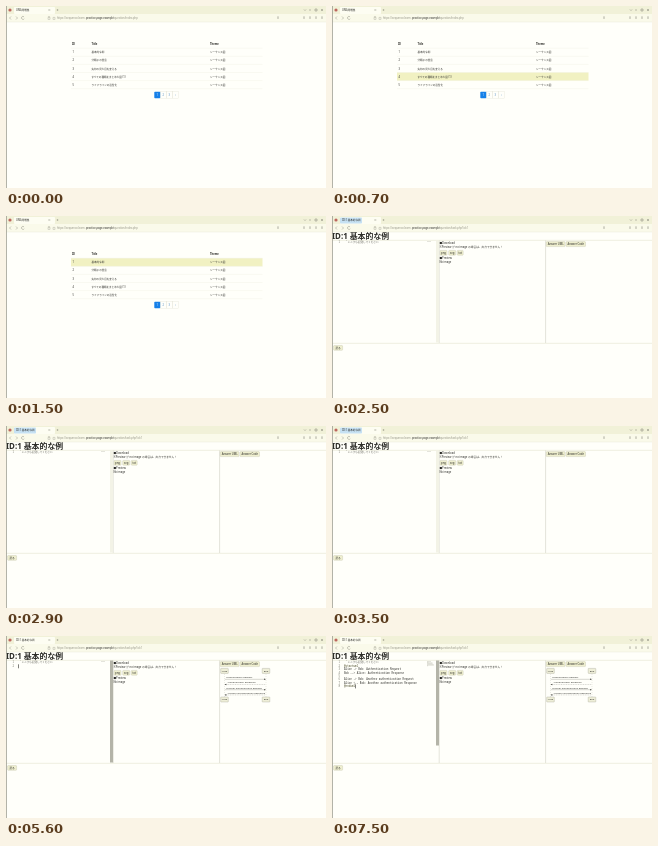
Write an HTML page that moves like this. It is 320 px wide and 182 px high and loops after 8000 ms.

```html
<!DOCTYPE html>
<html lang="ja">
<head>
<meta charset="utf-8">
<style>
html, body { margin: 0; width: 100%; height: 100%; overflow: hidden; background: #fffffa; }
svg { display: block; width: 100vw; height: 100vh; }
text { font-family: "Noto Sans", "Noto Sans CJK JP", "Noto Sans CJK", sans-serif; white-space: pre; }
.mono { font-family: "Noto Sans Mono", "Noto Sans CJK JP", "Noto Sans CJK", monospace; }
</style>
</head>
<body>
<svg id="stage" viewBox="0 0 320 182" preserveAspectRatio="none"></svg>
<script>
const LOOP = 8000, PAPER = '#fffffa', INK = '#2c2c28', RULE = '#deded0';
const BOLD = 'font-weight="700"', MID = 'text-anchor="middle"', MONO = 'class="mono"';
const stage = document.getElementById('stage');

const esc = s => s.replace(/&/g, '&amp;').replace(/</g, '&lt;');
const text = (x, y, s, size = 2.6, fill = INK, extra = '') =>
  `<text x="${x}" y="${y}" font-size="${size}" fill="${fill}" ${extra}>${esc(s)}</text>`;
const rect = (x, y, w, h, fill, extra = '') =>
  `<rect x="${x}" y="${y}" width="${w}" height="${h}" fill="${fill}" ${extra}/>`;
const path = (d, stroke = RULE, width = .5, extra = '') =>
  `<path d="${d}" fill="none" stroke="${stroke}" stroke-width="${width}" ${extra}/>`;
const group = (id, body) => `<g id="${id}">${body}</g>`;

function button(x, y, w, h, label) {
  return rect(x, y, w, h, '#efefcf', 'stroke="#b4b49c" stroke-width=".3" rx=".7"') +
    text(x + w / 2, y + h / 2 + .95, label, 2.7, INK, MID + ' font-weight="500"');
}

function browser() {
  const icons = [272, 298, 304, 310, 316].map(x => path(`M${x - 1} 11h2M${x - 1} 12.2h2`, '#77776a', .4)).join('');
  return rect(0, 0, 320, 8, '#f1f1d8') + rect(0, 8, 320, 8, '#fafaea') +
    rect(8, 1, 41, 7, '#fdfdf2', 'rx=".8"') +
    rect(8, 1.5, 22, 6, '#c6e1f3', 'id="loading" rx=".8"') +
    '<circle cx="4" cy="4" r="1.6" fill="#bd665d"/>' +
    text(10, 5, '', 2.6, INK, 'id="tabName"') +
    path('M42.5 3.2l1.6 1.6m0-1.6l-1.6 1.6M50.5 4h2m-1-1v2', '#77776a', .35) +
    path('M298 3.5l1 1 1-1M303 4h2M309 3h2v2h-2zM315 3l2 2m0-2l-2 2', '#66665c', .4) +
    path('M5 10.5l-1.5 1.5L5 13.5M10 10.5l1.5 1.5L10 13.5M18 10.8a1.5 1.5 0 1 0 .3 1.8', '#77776a', .4) +
    path('M42 11.4h2v2h-2zM42.4 11.3v-.8h1.2v.8M47 11.4h2v2h-2z', '#88887a', .3) +
    text(51, 12.9, 'https://sequence-learn.', 2.6, '#929284') +
    text(80, 12.9, 'practice-page.example', 2.6, INK) +
    text(107, 12.9, '', 2.6, '#929284', 'id="address"') + icons +
    path('M0 16H320', '#e6e6d4', .4) + rect(0, 0, .8, 182, '#a0a094');
}

function listPage() {
  const titles = ['基本的な例', '分類子の宣言', '矢印の見た目を変える', 'すべての種類をまとめた図 (1)', 'ライフラインの活性化'];
  let out = rect(65, 0, 191.5, 8.1, '#f1f1c2', 'id="hover"');
  ['ID', 'Title', 'Theme'].forEach((s, i) =>
    out += text([66, 85.5, 204][i], 39.4, s, 2.6, INK, BOLD));
  titles.forEach((s, i) => {
    const y = 47.3 + i * 8.1;
    out += text(66.5, y, String(i + 1)) + text(85.5, y, s, 2.55) + text(204, y, 'シーケンス図', 2.6);
  });
  for (let i = 0; i < 6; i++) out += path(`M65 ${42.2 + i * 8.1}H256.5`, '#ecece0', .35);
  out += rect(148.3, 85.7, 6, 6.5, '#1680e8', 'rx=".7"');
  ['1', '2', '3', '›'].forEach((s, i) => {
    const x = 148.3 + i * 6;
    if (i) out += rect(x, 85.7, 6, 6.5, 'none', 'stroke="#e2e2d4" stroke-width=".35"');
    out += text(x + 3, 89.9, s, 2.6, i ? '#4a86c0' : '#fff', MID);
  });
  return out;
}

function diagram() {
  let out = '';
  [[218.5, 'Alice'], [260, 'Bob']].forEach(([x, name]) => {
    out += path(`M${x} 38V61`, '#b0b0a6', .25, 'stroke-dasharray="1 1"');
    [32.4, 61].forEach(y => out += rect(x - 3.8, y, 7.6, 5, '#efefd8', 'stroke="#8e8e80" stroke-width=".3" rx=".5"') +
      text(x, y + 3.4, name, 2.5, INK, MID));
  });
  ['Authentication Request', 'Authentication Response', 'Another authentication Request', 'Another authentication Response']
    .forEach((s, i) => {
      const y = 43.3 + i * 5.2, back = i % 2, tip = back ? 218.8 : 259.7, d = back ? 1.5 : -1.5;
      out += text(back ? 221.5 : 220, y - 1.1, s, 2.4) +
        path(`M218.8 ${y}H259.7`, '#77776c', .3, back ? 'stroke-dasharray="1 .7"' : '') +
        `<path d="M${tip} ${y}l${d} -.8v1.6z" fill="${INK}"/>`;
    });
  return out;
}

function editor() {
  const code = ['@startuml', 'Alice -> Bob: Authentication Request', 'Bob --> Alice: Authentication Response', '',
    'Alice -> Bob: Another authentication Request', 'Alice <-- Bob: Another authentication Response', '@enduml'];
  const line = i => 27.3 + i * 3.4;
  const number = i => text(6.5, line(i), String(i + 1), 2.6, '#77776c', MONO);
  let pasted = '';
  code.forEach((s, i) => {
    pasted += number(i + 1) + text(12, line(i + 1), s, 2.65, s[0] === '@' ? '#4b4b28' : INK, MONO);
    if (s) pasted += path(`M95 ${26.2 + i * .6}h${s.length * .15}`, '#a5a594', .3);
  });
  return rect(104, 24.5, 3, 102, '', 'id="scroll"') + number(0) +
    text(14, line(0), "'ここから記述してください", 2.6, '#55554c', MONO) +
    path('M95 25.5h4', '#a5a594', .3) +
    group('lineTwo', number(1)) + group('code', pasted) + rect(12.3, 0, .6, 4, INK, 'id="caret"');
}

function taskPage() {
  return text(0, 22.5, 'ID:1 基本的な例', 7.9, INK, BOLD) +
    group('panels',
      path('M107.2 24.3V127M213.6 24.3V127', '#c8c8ba', .5) + path('M0 24.3H320M0 127.3H320', '#dcdcc4', .5) +
      editor() +
      text(107.4, 28, '■Download', 2.7) +
      text(107.4, 32, '※Preview が no image の場合は、出力できません！', 2.7) +
      button(108, 34.4, 7, 4.8, 'png') + button(116.7, 34.4, 7, 4.8, 'svg') + button(125.2, 34.4, 6, 4.8, 'txt') +
      text(107.4, 43.2, '■Preview', 2.7) + text(107.4, 47.2, 'No image', 2.6) +
      button(214.3, 25.6, 18.7, 5, 'Answer UML') + button(234, 25.6, 19.5, 5, 'Answer Code') +
      group('answer', diagram()) + button(1.6, 129.5, 9, 4.8, '戻る'));
}

stage.innerHTML = rect(0, 0, 320, 182, PAPER) +
  group('list', listPage()) + group('task', taskPage()) + browser();

const $ = id => document.getElementById(id);
const show = (id, on) => $(id).setAttribute('display', on ? 'inline' : 'none');

function draw(t) {
  const task = t >= 2400, pasted = t >= 6900;
  const row = t < 1100 ? 3 : t < 1300 ? 2 : t < 1500 ? 1 : 0;
  show('list', !task);
  show('task', task);
  show('panels', t >= 2500);
  show('hover', t >= 500);
  $('hover').setAttribute('y', 42.2 + row * 8.1);

  $('tabName').textContent = task ? 'ID:1 基本的な例' : 'UML問題集';
  $('address').textContent = task ? '/question/task.php?id=1' : '/question/index.php';
  show('loading', t >= 2500 && t < 3600);

  // The thumb darkens under the pointer and shortens once the text grows.
  $('scroll').setAttribute('fill', t >= 4200 ? '#b4b4a8' : '#f3f3e6');
  $('scroll').setAttribute('height', pasted ? 85 : 102);
  show('answer', t >= 4800);
  show('lineTwo', t >= 5600 && !pasted);
  show('code', pasted);
  show('caret', (t >= 5600 && t < 5900) || (t >= 6400 && t < 7100) || t >= 7500);
  $('caret').setAttribute('x', pasted ? 23.4 : 12.3);
  $('caret').setAttribute('y', pasted ? 48.4 : 28.3);
}

function tick() {
  draw(performance.now() % LOOP);
  requestAnimationFrame(tick);
}
tick();
</script>
</body>
</html>
```
